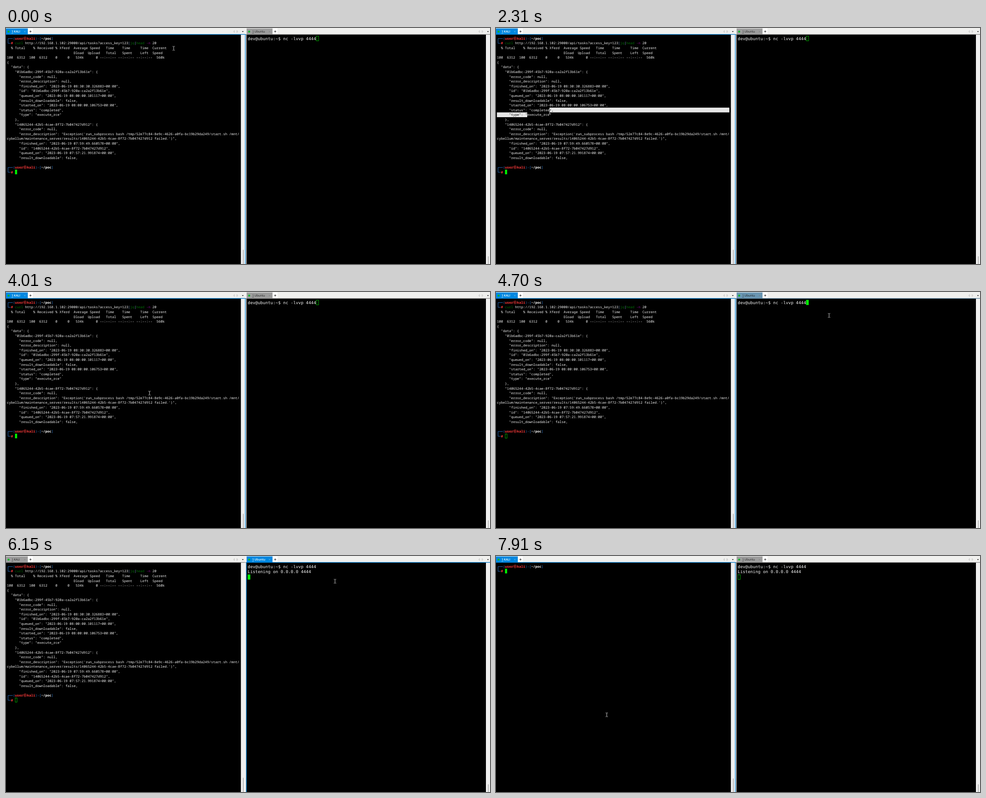
An HTML page with a canvas for the animation above (8 s loop, 1068 by 524 pixels).

```html
<!DOCTYPE html>
<html lang="en">
<head>
<meta charset="utf-8">
<title>Two terminals</title>
<style>
html, body { margin: 0; width: 100%; height: 100%; overflow: hidden; background: #000; }
canvas { display: block; width: 1068px; height: 524px; }
</style>
</head>
<body>
<canvas id="stage"></canvas>
<script>
const W = 1068, H = 524, LOOP = 8000;
const canvas = document.getElementById('stage');
const ctx = canvas.getContext('2d');
const ratio = window.devicePixelRatio || 1;
canvas.width = W * ratio;
canvas.height = H * ratio;

const BLUE = [0, 135, 224], GREY = [157, 157, 157], PALE = [240, 240, 240];
const INK = '#f4f4f4', LIME = '#00f400', RED = '#ff3b3b', EDGE = '#2b72c4', GREEN = '#006e06';

// Character grids of the two panes; y is the middle of the first row.
const left = { x: 2, y: 23.1, cw: 4.46, lh: 10.6, size: 7.43, font: '"Noto Sans Mono", monospace' };
const right = { x: 533.3, y: 23.4, cw: 5.59, lh: 11.75, size: 9.29, font: '"DejaVu Sans Mono", monospace' };

const OUTPUT = `  % Total    % Received % Xferd  Average Speed   Time    Time     Time  Current
                                 Dload  Upload   Total   Spent    Left  Speed
100  6312  100  6312    0     0   534k      0 --:--:-- --:--:-- --:--:--  560k
{
  "data": {
    "01b6adbc-299f-45b7-920a-ca2a2f13b61e": {
      "error_code": null,
      "error_description": null,
      "finished_on": "2023-06-19 08:30:30.326883+00:00",
      "id": "01b6adbc-299f-45b7-920a-ca2a2f13b61e",
      "queued_on": "2023-06-19 08:00:00.101117+00:00",
      "result_downloadable": false,
      "started_on": "2023-06-19 08:00:00.106753+00:00",
      "status": "completed",
      "type": "execute_rce"
    },
    "14065244-42b5-4cae-8f72-7b047427d912": {
      "error_code": null,
      "error_description": "Exception('run_subprocess bash /tmp/52e77c84-8e9c-4626-a0fa-bc19b29da249/start.sh /mnt/
cybellum/maintenance_server/results/14065244-42b5-4cae-8f72-7b047427d912 failed.')",
      "finished_on": "2023-06-19 07:59:49.660578+00:00",
      "id": "14065244-42b5-4cae-8f72-7b047427d912",
      "queued_on": "2023-06-19 07:57:21.991874+00:00",
      "result_downloadable": false,`.split('\n');

// Moments of the session
const DRAG = 1940, DESELECT = 3610, FOCUS_RIGHT = 4560, ENTER = 5410, LISTEN = 5560;
const FOCUS_LEFT = 6730, CLEAR = 7910;

// Pointer strokes: begin, end, target, optional bend
const STROKES = [
  { from: 290, to: 1240, end: [102, 198], bend: [150, 330] },
  { from: 1370, to: 1640, end: [72, 194] },
  { from: DRAG, to: 2200, end: [110, 192] },
  { from: 2310, to: 2310, end: [118, 187] },
  { from: 2460, to: 2860, end: [117, 193] },
  { from: 3310, to: 4310, end: [634, 246], bend: [112, 216] },
  { from: 4430, to: 4700, end: [735, 52] },
  { from: LISTEN, to: 6150, end: [726, 56] },
  { from: 6300, to: FOCUS_LEFT, end: [244.4, 352.5] }
];
const STEP = 138;

function pointerAt(t) {
  let pos = [370, 45];
  for (const { from, to, end, bend } of STROKES) {
    if (t < from) break;
    const steps = Math.round((to - from) / STEP) + 1;
    const gap = (to - from) / (steps - 1 || 1) || 1;
    const p = Math.min(1, (Math.floor((t - from) / gap) + 1) / steps);
    const start = pos;
    pos = end.map((b, i) => {
      const c = bend ? bend[i] : (start[i] + b) / 2;
      return start[i] * (1 - p) ** 2 + 2 * c * p * (1 - p) + b * p * p;
    });
  }
  return pos;
}

const ramp = (t, a, b) => Math.min(1, Math.max(0, (t - a) / (b - a)));
const mix = (a, b, k) => `rgb(${a.map((v, i) => Math.round(v + (b[i] - v) * k))})`;

function rect(x, y, w, h, color) {
  ctx.fillStyle = color;
  ctx.fillRect(x, y, w, h);
}

function line(color, width, ...points) {
  ctx.strokeStyle = color;
  ctx.lineWidth = width;
  ctx.beginPath();
  points.forEach(([x, y]) => ctx.lineTo(x, y));
  ctx.stroke();
}

function print(grid, row, col, text, color = INK, weight = 500) {
  ctx.font = `${weight} ${grid.size}px ${grid.font}`;
  ctx.fillStyle = color;
  const base = grid.y + row * grid.lh + grid.size * 0.35;
  [...text].forEach((ch, i) => {
    if (ch !== ' ') ctx.fillText(ch, grid.x + (col + i) * grid.cw, base);
  });
}

function block(grid, row, col, focused) {
  const x = grid.x + col * grid.cw, y = grid.y + (row - 0.5) * grid.lh;
  if (focused) return rect(x, y, grid.cw + 0.2, grid.lh - 0.4, LIME);
  ctx.strokeStyle = '#00b800';
  ctx.lineWidth = 0.9;
  ctx.strokeRect(x + 0.5, y + 0.5, grid.cw - 0.5, grid.lh - 1.2);
}

function prompt(row) {
  const y = left.y + row * left.lh, low = y + left.lh;
  line(EDGE, 0.9, [15, y + 0.4], [4.5, y + 0.4], [4.5, low + 0.4], [10.5, low + 0.4]);
  const put = (col, text, color, weight) => print(left, row, col, text, color, weight);
  put(3, '(', EDGE);
  put(4, 'user', RED, 700);
  ctx.font = '7.6px "Noto Sans CJK KR", "Noto Sans CJK JP", "Noto Sans CJK", sans-serif';
  ctx.fillText('㉿', left.x + 8 * left.cw + 0.6, y + 2.7);
  put(10, 'kali', RED, 700);
  put(14, ')-[', EDGE);
  put(17, '~/poc', '#fff', 700);
  put(22, ']', EDGE);
  print(left, row + 1, 2, '#', RED, 700);
}

function command() {
  const put = (col, text, color) => print(left, 1, col, text, color);
  put(4, 'curl', GREEN);
  put(9, 'http://192.168.1.102:29000/api/tasks?access_key=123');
  put(60, '|', '#8fb8dc');
  put(61, 'jq', GREEN);
  put(63, '|', '#8fb8dc');
  put(64, 'head', GREEN);
  put(69, '-n', '#8a0a92');
  put(72, '20');
}

function mark(row, a, b) {
  rect(left.x + a * left.cw, left.y + (row - 0.5) * left.lh, (b - a) * left.cw, left.lh, '#e6e6e6');
  print(left, row, a, OUTPUT[row - 2].slice(a, b), '#111');
}

// Selection runs from its anchor to the cell under the pointer.
function select([x, y]) {
  const row = 16, anchor = 15, word = 26;
  const col = Math.min(word, Math.round((x - left.x) / left.cw));
  if (y < left.y + (row - 0.5) * left.lh) {
    mark(row - 1, col, 115);
    mark(row, 0, anchor);
  } else {
    mark(row, anchor, col);
  }
}

function tab(x, width, label, glow) {
  const active = glow > 0.9, ink = active ? '#fff' : '#1c1c1c';
  rect(x, 1, width, 13, mix(GREY, BLUE, glow));
  ctx.fillStyle = '#12b52b';
  ctx.beginPath();
  ctx.arc(x + 5.6, 8, 2.3, 0, 7);
  ctx.fill();
  ctx.font = `${active ? 600 : 400} 6.5px "Open Sans", sans-serif`;
  ctx.fillStyle = ink;
  ctx.fillText('1', x + 12.2, 10.4);
  ctx.fillText(label, x + 17.3, 10.4);
  rect(x + 12.2, 11.4, 3.6, 0.6, ink);
  const cx = x + width - 6.5, cross = active ? '#7fc0ea' : '#777';
  line(cross, 0.7, [cx - 1.4, 6.5], [cx + 1.4, 9.3]);
  line(cross, 0.7, [cx + 1.4, 6.5], [cx - 1.4, 9.3]);
  const px = x + width + 6;
  rect(px - 5, 1, 10, 13, '#fff');
  rect(px - 2.3, 7.2, 4.6, 1.1, '#333');
  rect(px - 0.55, 5.4, 1.1, 4.6, '#333');
}

function barTools(x) {
  for (const [tip, base] of [[x - 1.2, x + 1.2], [x + 8.8, x + 6.4]]) {
    line('#b4b4b4', 0.7, [base, 5.5], [tip, 7.8], [base, 10.1], [base, 5.5]);
  }
  ctx.fillStyle = '#222';
  ctx.beginPath();
  ctx.moveTo(x + 17.5, 7);
  ctx.lineTo(x + 21.5, 7);
  ctx.lineTo(x + 19.5, 9.2);
  ctx.fill();
}

function scrollbar(x, width, thumb) {
  rect(x, 14.8, width, H, mix(PALE, PALE, 0));
  rect(x + 4.7, thumb, 1, H, '#858585');
}

function frame(t) {
  const back = ramp(t, 6590, 6880);
  const glowL = 1 - ramp(t, 4700, 4990) + back;
  const glowR = ramp(t, FOCUS_RIGHT, 4990) - back;
  rect(0, 0, W, 14, '#f0f0ee');
  tab(0, 48, 'KALI', glowL);
  tab(531, 57, 'Ubuntu', glowR);
  barTools(503);
  barTools(1044);
  scrollbar(518.3, 11.5, t < CLEAR ? 492.5 : 494);
  scrollbar(1059, 9, 507);
  rect(0, 13.6, 528.5, 1.2, mix(GREY, BLUE, glowL));
  rect(530, 13.6, 538, 1.2, mix(GREY, BLUE, glowR));
  rect(527.4, 14, 1.2, H, mix(PALE, BLUE, glowL));
  rect(529.8, 14, 1.2, H, mix(GREY, BLUE, glowR));
}

function pointer([x, y]) {
  ctx.save();
  ctx.globalCompositeOperation = 'difference';
  const ink = '#d6d6d6';
  rect(x - 0.5, y - 3.9, 1, 7.8, ink);
  for (const side of [-4.7, 3.9]) {
    rect(x - 2.5, y + side, 2, 0.9, ink);
    rect(x + 0.5, y + side, 2, 0.9, ink);
  }
  ctx.restore();
}

function draw(t) {
  ctx.setTransform(ratio, 0, 0, ratio, 0, 0);
  ctx.textRendering = 'geometricPrecision';
  rect(0, 0, W, H, '#000');
  frame(t);

  const focusRight = t >= FOCUS_RIGHT && t < FOCUS_LEFT;
  const mouse = pointerAt(t);
  prompt(0);
  if (t < CLEAR) {
    command();
    OUTPUT.forEach((text, i) => print(left, i + 2, 0, text));
    if (t >= DRAG && t < DESELECT) select(mouse);
    prompt(27);
  }
  block(left, t < CLEAR ? 28 : 1, 4, !focusRight);

  print(right, 0, 0, 'dev@ubuntu:~$ nc -lvvp 4444');
  if (t >= LISTEN) print(right, 1, 0, 'Listening on 0.0.0.0 4444');
  const row = (t >= ENTER) + (t >= LISTEN);
  block(right, row, row ? 0 : 27, focusRight);
  pointer(mouse);
}

const start = performance.now();
function tick() {
  draw((performance.now() - start) % LOOP);
  requestAnimationFrame(tick);
}
tick();
</script>
</body>
</html>
```
